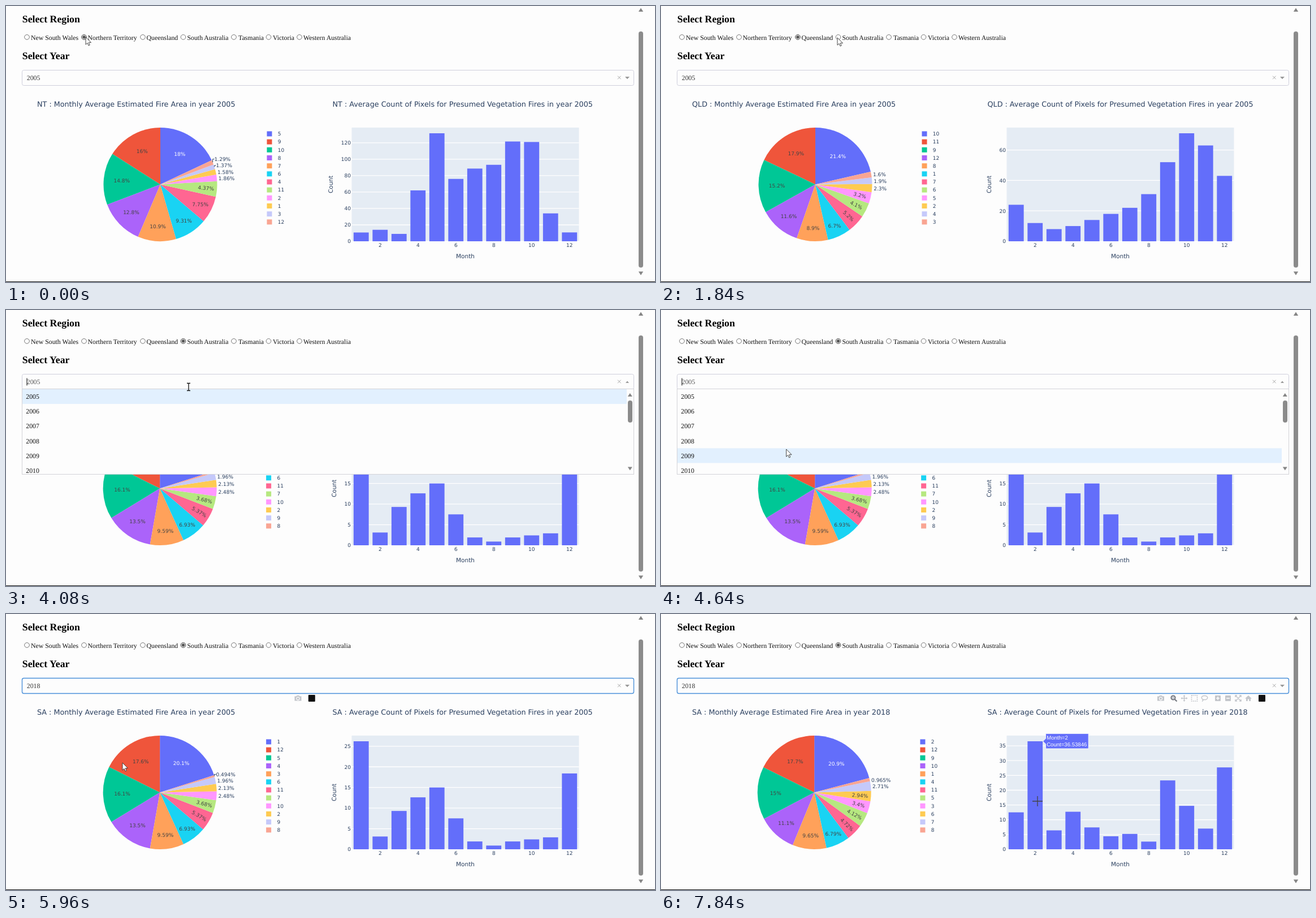
An HTML page for the animation above (8000 ms loop, 1148 px wide and 488 px high).

```html
<!DOCTYPE html>
<html lang="en">
<head>
<meta charset="utf-8">
<title>Fire dashboard</title>
<style>
  html, body { margin: 0; width: 100%; height: 100%; overflow: hidden; background: #fdfdfd; }
  svg { display: block; text-rendering: geometricPrecision; }
  .serif { font: 11.8px 'Liberation Serif', 'Times New Roman', serif; fill: #111; }
  .head { font-size: 17.75px; font-weight: bold; fill: #000; }
  .plot { font: 9px 'DejaVu Sans', Verdana, sans-serif; fill: #2a3f5f; }
  .title { font-size: 12.76px; }
  .axis { font-size: 10.5px; }
  .mid { text-anchor: middle; }
  .end { text-anchor: end; }
  .tip { font: 9.6px 'Liberation Sans', Arial, sans-serif; fill: #fff; }
</style>
</head>
<body>
<svg id="stage" width="1148" height="488" viewBox="0 0 1148 488"></svg>
<script>
const LOOP = 8000;
const COLORS = ['#636efa', '#ef553b', '#00c796', '#ab63fa', '#ffa15a', '#19d3f3',
  '#ff6692', '#b6e880', '#ff97ff', '#fecb52', '#c5c9fa', '#f9a593'];
const REGIONS = [['New South Wales', 37, 44], ['Northern Territory', 138, 144.5], ['Queensland', 242, 248.5],
  ['South Australia', 313.5, 320.5], ['Tasmania', 403, 411], ['Victoria', 464.5, 472], ['Western Australia', 519, 526]];

const CHARTS = [
  { from: 0, region: 'NT', year: 2005, cx: 273, step: 20, countX: 578,
    months: [5, 9, 10, 8, 7, 6, 4, 11, 2, 1, 3, 12],
    shares: [18, 16, 14.8, 12.8, 10.9, 9.31, 7.75, 4.37, 1.86, 1.58, 1.37, 1.29],
    bars: [10.7, 14, 9, 62, 131.6, 76, 88.6, 93.2, 121.6, 121, 34, 10.8] },
  { from: 1280, region: 'QLD', year: 2005, cx: 273, step: 20, countX: 584,
    months: [10, 11, 9, 12, 8, 1, 7, 6, 5, 2, 4, 3],
    shares: [21.4, 17.9, 15.2, 11.6, 8.9, 6.7, 5.2, 4.1, 3.2, 2.3, 1.9, 1.6],
    bars: [24, 12, 8, 10, 14, 18, 22, 31, 52, 71, 63, 43] },
  { from: 2360, region: 'SA', year: 2005, cx: 272.2, step: 5, countX: 584,
    months: [1, 12, 5, 4, 3, 6, 11, 7, 10, 2, 9, 8],
    shares: [20.1, 17.6, 16.1, 13.5, 9.59, 6.93, 5.37, 3.68, 2.48, 2.13, 1.96, 0.494],
    bars: [26.2, 3.1, 9.3, 12.6, 15, 7.5, 1.9, 0.9, 1.9, 2.4, 2.9, 18.4] },
  { from: 6240, region: 'SA', year: 2018, cx: 271.2, step: 5, countX: 584,
    months: [2, 12, 9, 10, 1, 4, 11, 5, 3, 6, 7, 8],
    shares: [20.9, 17.7, 15, 11.1, 9.65, 6.79, 4.72, 4.12, 3.4, 2.94, 2.71, 0.965],
    bars: [12.5, 36.53846, 6.4, 12.7, 7.4, 4.4, 5.2, 2.6, 23.3, 14.7, 7, 27.7] }
];

// time, x, y of the pointer tip
const POINTER = [[0, 141, 55], [160, 141, 55], [860, 238, 56], [1320, 238, 56], [1800, 312, 56], [2400, 312, 56],
  [2800, 320, 80], [3040, 320, 80], [3440, 323, 136], [4240, 323, 136], [4760, 206, 263], [6000, 206, 263],
  [6440, 59, 227], [6840, 59, 227], [7760, 666, 331]];
const SCROLL = [[4840, 0], [5000, 79.3], [5200, 79.3], [5340, 158.6], [5480, 158.6], [5620, 238]];
const RADIO = [[0, 1], [1000, 2], [1960, 3]];
const OPEN_AT = 3560, CLOSE_AT = 5960, HOVER_AT = 5700;
const ROW = 26.1, LIST_TOP = 140;
const PLOT = { x: 611.5, y: 215, w: 402, h: 201 };
const PITCH = PLOT.w / 12, FLOOR = PLOT.y + PLOT.h;

const text = (s, x, y, cls, extra = '') => `<text x="${x}" y="${y}" class="${cls}" ${extra}>${s}</text>`;
const rect = (x, y, w, h, fill, extra = '') => `<rect x="${x}" y="${y}" width="${w}" height="${h}" fill="${fill}" ${extra}/>`;
const path = (d, fill, extra = '') => `<path d="${d}" fill="${fill}" ${extra}/>`;
const group = (id, body, extra = '') => `<g id="${id}" ${extra}>${body}</g>`;

function pie({ cx, shares }) {
  const cy = 315.5, r = 100.5, total = shares.reduce((a, b) => a + b);
  const at = (turn, d) => [cx + d * Math.sin(turn * 2 * Math.PI), cy - d * Math.cos(turn * 2 * Math.PI)];
  let slices = '', labels = '', turn = 1, lastY = 999;
  shares.forEach((p, i) => {
    // the first slice lies right of noon, the others run anticlockwise
    const start = i ? turn - p / total : 0, end = i ? turn : p / total;
    if (i) turn = start;
    const a = at(start, r), b = at(end, r), mid = (start + end) / 2;
    slices += path(`M${cx} ${cy}L${a}A${r} ${r} 0 0 1 ${b}Z`, COLORS[i]);
    if (p < 2.75) {
      const [x, y0] = at(mid, r), y = Math.min(y0 + 0.7, lastY - 11.3);
      lastY = y;
      if (y0 - y > 1) labels += path(`M${x} ${y0}V${y}H${x + 3}`, 'none', 'stroke="#2a3f5f"');
      labels += text(p + '%', x + 3, y + 3.2, 'plot');
    } else {
      const [x, y] = at(mid, Math.min(64 + (18 - Math.min(p, 18)) * 1.45, 81));
      const spin = p < 6 ? mid * 360 - 90 : 0;
      labels += text(p + '%', 0, 3.2, 'plot mid',
        `transform="translate(${x} ${y}) rotate(${spin})" style="fill:${i ? '#444' : '#fff'}"`);
    }
  });
  return slices + labels;
}

function legend({ cx, months }) {
  const x = 461.5 + (cx - 273) * 1.7;
  return months.map((m, i) => {
    const y = 226 + i * 14.17;
    return rect(x, y - 4.5, 9, 9, COLORS[i]) + text(m, x + 19.3, y + 3.3, 'plot');
  }).join('');
}

const barX = i => PLOT.x + PITCH * (i + 0.5);
const barTop = (c, v) => FLOOR - v / Math.max(...c.bars) * 0.95 * PLOT.h;

function barChart(c) {
  let s = rect(PLOT.x, PLOT.y, PLOT.w, PLOT.h, '#e5ecf4');
  for (let v = 0; barTop(c, v) > PLOT.y; v += c.step) {
    const y = barTop(c, v);
    s += path(`M${PLOT.x} ${y}h${PLOT.w}`, 'none', 'stroke="#fff" stroke-width="1.3"');
    s += text(v, 610, y + 3.3, 'plot end');
  }
  c.bars.forEach((v, i) => {
    const y = barTop(c, v);
    s += rect(barX(i) - PITCH * 0.4, y, PITCH * 0.8, FLOOR - y, '#636efa');
    if (i % 2) s += text(i + 1, barX(i), 426.3, 'plot mid');
  });
  return s + text('Month', 812.5, 445.8, 'plot axis mid') +
    text('Count', 0, 0, 'plot axis mid', `transform="translate(${c.countX} 315.5) rotate(-90)"`);
}

const chart = (c, i) => group('chart' + i,
  text(`${c.region} : Monthly Average Estimated Fire Area in year ${c.year}`, 55, 177.5, 'plot title') +
  text(`${c.region} : Average Count of Pixels for Presumed Vegetation Fires in year ${c.year}`, 577.5, 177.5, 'plot title') +
  pie(c) + legend(c) + barChart(c));

function modeIcons() {
  const GREY = '#c3c6cb', line = 'stroke-width="1.5" stroke="' + GREY + '"';
  const icon = (x, body) => `<g transform="translate(${x} 149)">${body}</g>`;
  const camera = x => icon(x, path('M-6-3.5h3l1-1.5h4l1 1.5h3v8h-12z', GREY) +
    '<circle cy="0.5" r="2.6" fill="#c3c6cb" stroke="#fdfdfd" stroke-width="1.2"/>');
  const logo = x => icon(x, rect(-6, -6, 12, 12, '#111', 'rx="1"'));
  const sign = (x, d) => icon(x, rect(-5, -5, 10, 10, GREY, 'rx="1"') + path(d, 'none', 'stroke="#fdfdfd" stroke-width="1.6"'));
  const zoom = icon(907, '<circle cx="-1" cy="-1" r="3.7" fill="#c9ccd2" stroke="#74787f" stroke-width="1.8"/>' +
    path('M2 2L5.5 5.5', 'none', 'stroke="#74787f" stroke-width="2.2"'));
  const pan = icon(925.5, path('M-5 0H5M0-5V5', 'none', line) +
    path('M-6 0l2.5-2v4zM6 0l-2.5-2v4zM0-6l-2 2.5h4zM0 6l-2-2.5h4z', GREY));
  const box = icon(943.5, rect(-5, -5, 10, 10, 'none', line + ' stroke-dasharray="2 1.2"'));
  const lasso = icon(961.5, '<ellipse cy="-1" rx="5.2" ry="3.6" fill="none" ' + line + '/>' + path('M-3.5 1.5q2 2-1 4', 'none', line));
  const auto = icon(1021, path('M-5-2v-3h3M2-5h3v3M5 2v3h-3M-2 5h-3v-3M-4-4L4 4M4-4L-4 4', 'none', line));
  const home = icon(1039, path('M-6 .5L0-5 6 .5H4V5H1.2V1.5H-1.2V5H-4V.5z', GREY));
  return group('leftBar', camera(516.5) + logo(540.8)) +
    group('rightBar', camera(884) + zoom + pan + box + lasso + sign(985, 'M-3 0H3M0-3V3') + sign(1003, 'M-3 0H3') + auto + home + logo(1063));
}

function dropdown() {
  let rows = '';
  for (let i = 0; i < 16; i++)
    rows += text(2005 + i, 35.3, LIST_TOP + ROW * (i + 0.5) + 4.2, 'serif', i ? '' : 'font-weight="bold"');
  return group('menu',
    rect(28.5, 139.5, 1082, 151, '#fdfdfd', 'stroke="#d3d3d8"') +
    `<clipPath id="listClip">${rect(29, LIST_TOP, 1069, 150, '#000')}</clipPath>` +
    `<g clip-path="url(#listClip)">${group('rows', rect(29, LIST_TOP, 1069, ROW, '#e2f0fe', 'id="hot"') + rows)}</g>` +
    path('M1099.8 153h8l-4-6zM1099.8 277.5h8l-4 6z', '#858585') +
    rect(1100, 160, 8, 39, '#8b8b8b', 'rx="4" id="thumb"'));
}

const page = () =>
  text('Select Region', 28.8, 28.6, 'serif head') + text('Select Year', 28.8, 94.4, 'serif head') +
  REGIONS.map(([name, cx, x]) =>
    `<circle cx="${cx}" cy="55" r="4.3" fill="#fff" stroke="#777"/>` + text(name, x, 59.6, 'serif')).join('') +
  group('dot', '<circle cy="55" r="4.3" fill="#fff" stroke="#555"/><circle cy="55" r="2.8" fill="#555"/>') +
  path('M1118.8 10h8.4l-4.2-6.5zM1118.8 469.5h8.4l-4.2 6.5z', '#858585') +
  rect(1119, 45, 8, 417.5, '#8b8b8b', 'rx="4"') +
  rect(0, 487, 1148, 1, '#111');

const select = () =>
  rect(28.5, 113.5, 1082, 27, '#fdfdfd', 'rx="3" id="box"') +
  text('2005', 36.8, 131, 'serif', 'id="year"') +
  path('M1082 123.7l5.6 5.6M1087.6 123.7l-5.6 5.6', 'none', 'stroke="#a5a5a5"') +
  path('M1095 125h8l-4 4.3z', '#999', 'id="down"') + path('M1096 129h6l-3-3.6z', '#999', 'id="up"') +
  rect(36.5, 120.5, 1.1, 13, '#111', 'id="caret"');

const tooltip = () => group('tip',
  path('M.5 0L5.5-5V-13.5H81V13H5.5V5z', '#636efa', 'stroke="#fdfdfd" stroke-width=".8"') +
  text('', 7, -3.4, 'tip', 'id="tipMonth"') + text('', 7, 9, 'tip', 'id="tipCount"'));

const cursors = () =>
  group('arrow', path('M0 0V13.2L3.1 10.4 5 15 7.2 14 5.2 9.7H9.5z', '#fff', 'stroke="#333" stroke-width=".9"')) +
  group('beam', path('M-3-6.5h2.2L0-5.7.8-6.5H3M0-5.7V5.7M-3 6.5h2.2L0 5.7.8 6.5H3', 'none', 'stroke="#111" stroke-width="1.3"')) +
  group('cross', path('M-9 0H9M0-9V9', 'none', 'stroke="#444" stroke-width="1.3"'));

document.getElementById('stage').innerHTML = page() + CHARTS.map(chart).join('') + modeIcons() +
  select() + dropdown() + tooltip() + cursors();

const $ = id => document.getElementById(id);
const show = (id, on) => { $(id).style.display = on ? '' : 'none'; };
const move = (id, x, y) => $(id).setAttribute('transform', `translate(${x} ${y})`);
const set = (id, attrs) => { for (const k in attrs) $(id).setAttribute(k, attrs[k]); };

function ease(keys, t) {
  const i = keys.findIndex(k => k[0] > t);
  if (i < 0) return keys[keys.length - 1].slice(1);
  if (!i) return keys[0].slice(1);
  const a = keys[i - 1], b = keys[i], u = (t - a[0]) / (b[0] - a[0]), e = u * u * (3 - 2 * u);
  return a.slice(1).map((v, j) => v + (b[j + 1] - v) * e);
}

function render(t) {
  const [x, y] = ease(POINTER, t), [scroll] = ease(SCROLL, t);
  const open = t >= OPEN_AT && t < CLOSE_AT, done = t >= CLOSE_AT;

  const current = CHARTS.filter(c => c.from <= t).length - 1;
  CHARTS.forEach((c, i) => show('chart' + i, i === current));
  move('dot', REGIONS[RADIO.filter(k => k[0] <= t).pop()[1]][1], 0);

  $('year').textContent = done ? 2018 : 2005;
  $('year').style.fill = open ? '#555' : '#333';
  set('box', { stroke: done ? '#4a90d9' : '#cfcfdc', 'stroke-width': done ? 1.4 : 1 });
  show('down', !open);
  show('up', open);
  show('caret', open && (t - OPEN_AT) % 1040 < 530);

  show('menu', open);
  move('rows', 0, -scroll);
  // hover is only re-evaluated once the pointer moves after scrolling
  const hot = Math.max(0, Math.floor((y - LIST_TOP + (t < HOVER_AT ? 0 : scroll)) / ROW));
  set('hot', { y: LIST_TOP + hot * ROW });
  set('thumb', { y: 160 + scroll * 0.262 });

  const overGraph = !open && y > 141;
  show('leftBar', overGraph && x < 570);
  show('rightBar', overGraph && x >= 570);

  const inPlot = overGraph && x > PLOT.x && x < PLOT.x + PLOT.w && y > PLOT.y && y < FLOOR;
  show('tip', inPlot);
  if (inPlot) {
    const c = CHARTS[current], i = Math.floor((x - PLOT.x) / PITCH);
    move('tip', barX(i) + PITCH * 0.4, barTop(c, c.bars[i]));
    $('tipMonth').textContent = 'Month=' + (i + 1);
    $('tipCount').textContent = 'Count=' + c.bars[i];
  }

  const kind = inPlot ? 'cross' : y > 114 && y < 140 ? 'beam' : 'arrow';
  for (const id of ['arrow', 'beam', 'cross']) {
    show(id, id === kind);
    move(id, x, y);
  }
}

const began = performance.now();
function tick() {
  render((performance.now() - began) % LOOP);
  requestAnimationFrame(tick);
}
tick();
</script>
</body>
</html>
```
